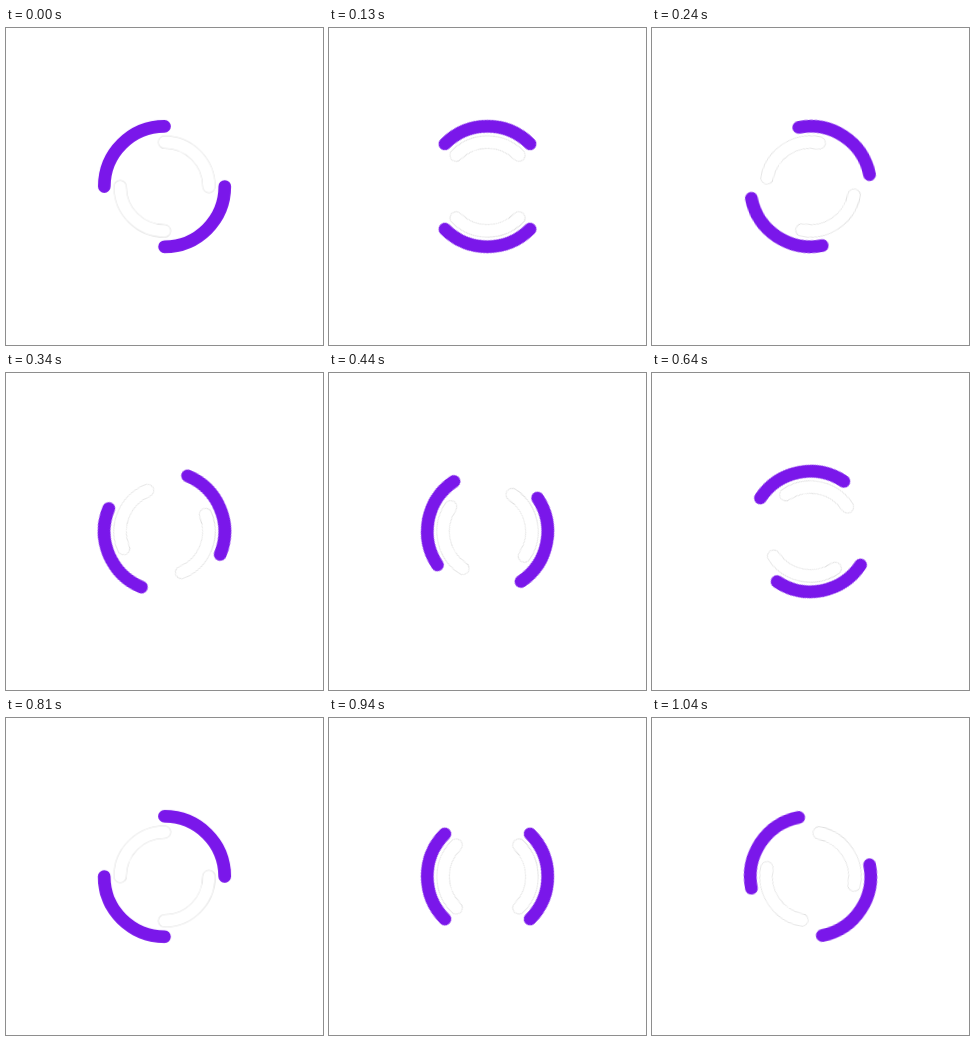
Write an HTML page without scripts that moves like this. It is 317 px wide and 317 px high and loops after 1080 ms.

```html
<!DOCTYPE html>
<html lang="en">
<head>
<meta charset="utf-8">
<title>Double ring loader</title>
<style>
  html, body {
    margin: 0;
    width: 100%;
    height: 100%;
    overflow: hidden;
    background: #fff;
  }
  svg {
    display: block;
    width: 100%;
    height: 100%;
  }
  path {
    fill: none;
    stroke-linecap: round;
  }
  .ring {
    --step: 11.25deg;
    transform-origin: 50px 50px;
    animation: turn 540ms step-end infinite;
  }
  .inner { --step: -11.25deg; }
  .outer path { stroke: #7a17ea; stroke-width: 4; }
  .inner .edge { stroke: #d4d4d4; stroke-width: 4.1; }
  .inner .fill { stroke: #fff; stroke-width: 3.8; }

  /* Half a turn in 16 ticks of 30 or 40 ms */
  @keyframes turn {
    0%     { transform: rotate(0deg); }
    5.55%  { transform: rotate(var(--step)); }
    12.96% { transform: rotate(calc(2 * var(--step))); }
    18.51% { transform: rotate(calc(3 * var(--step))); }
    24.07% { transform: rotate(calc(4 * var(--step))); }
    31.48% { transform: rotate(calc(5 * var(--step))); }
    37.03% { transform: rotate(calc(6 * var(--step))); }
    42.59% { transform: rotate(calc(7 * var(--step))); }
    50%    { transform: rotate(calc(8 * var(--step))); }
    55.55% { transform: rotate(calc(9 * var(--step))); }
    62.96% { transform: rotate(calc(10 * var(--step))); }
    68.51% { transform: rotate(calc(11 * var(--step))); }
    74.07% { transform: rotate(calc(12 * var(--step))); }
    81.48% { transform: rotate(calc(13 * var(--step))); }
    87.03% { transform: rotate(calc(14 * var(--step))); }
    92.59% { transform: rotate(calc(15 * var(--step))); }
    100%   { transform: rotate(calc(16 * var(--step))); }
  }
</style>
</head>
<body>
<svg viewBox="0 0 100 100" aria-label="Loading">
  <defs>
    <path id="arcs" d="M50 36A14 14 0 0 1 64 50M50 64A14 14 0 0 1 36 50"/>
  </defs>
  <g class="ring outer">
    <path d="M31 50A19 19 0 0 1 50 31M69 50A19 19 0 0 1 50 69"/>
  </g>
  <g class="ring inner">
    <use class="edge" href="#arcs"/>
    <use class="fill" href="#arcs"/>
  </g>
</svg>
</body>
</html>
```
